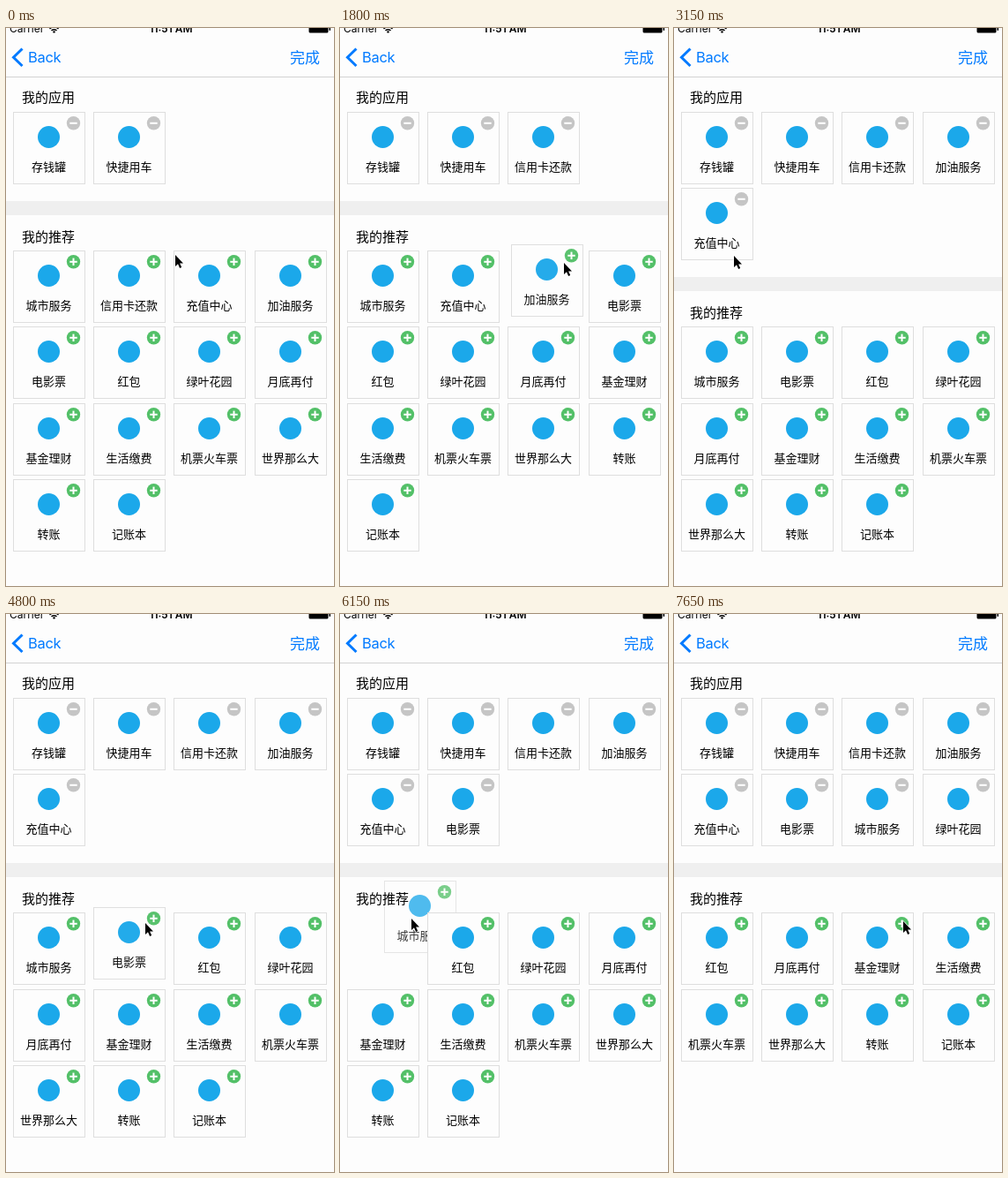
Animation of 372 by 632 pixels, one loop 8 s. Source, as an HTML page:

```html
<!DOCTYPE html>
<html lang="zh-CN">
<head>
<meta charset="utf-8">
<title>应用管理</title>
<style>
  html, body { margin: 0; width: 100%; height: 100%; overflow: hidden; background: #fdfdfd; }
  svg { display: block; width: 372px; height: 632px; }
  text { font-family: "Noto Sans CJK SC", "Noto Sans CJK", sans-serif; fill: #000; }
  .latin { font-family: Inter, Roboto, sans-serif; }
  .status { font-size: 12px; }
  .bold { font-weight: 600; }
  .link { fill: #007aff; font-size: 17px; }
  .back { font-size: 16.5px; letter-spacing: -.3px; }
  .title { font-size: 15px; }
  .name { font-size: 13px; text-anchor: middle; }
  .box { fill: #fdfdfd; stroke: #dedede; }
  .icon { fill: #1ba8ea; }
  .badge { fill: #53c068; }
  .sign { stroke: #fff; stroke-width: 2; fill: none; }
  .mine .badge { fill: #c5c5c5; }
  .mine .bar { display: none; }
</style>
</head>
<body>
<svg viewBox="0 0 372 632" xmlns="http://www.w3.org/2000/svg">
  <rect width="372" height="632" fill="#fdfdfd"/>
  <g id="cards"></g>

  <text class="title" x="18" y="84">我的应用</text>
  <g id="more">
    <rect y="196" width="372" height="16" fill="#efefef"/>
    <text class="title" x="18" y="242">我的推荐</text>
  </g>

  <g id="nav">
    <text class="latin status" x="4" y="5">Carrier</text>
    <path d="M49.5 .8Q54.5 -3 59.5 .8M51.5 2.8Q54.5 .6 57.5 2.8" fill="none" stroke="#000" stroke-width="1.5"/>
    <circle cx="54.5" cy="4.4" r="1.2"/>
    <text class="latin status bold" x="187" y="5" text-anchor="middle">11:51 AM</text>
    <rect x="343.5" y="-4" width="22" height="9.5" rx="1.5"/>
    <rect x="366.5" y="-1" width="1.5" height="4" rx=".7"/>
    <path d="M18.5 23.5L8.5 33.2L18.5 43" fill="none" stroke="#007aff" stroke-width="3"/>
    <text class="latin link back" x="25" y="39">Back</text>
    <text class="link" x="322" y="39.5">完成</text>
    <rect y="55" width="372" height="1" fill="#d2d2d2"/>
  </g>

  <path id="cursor" d="M1 1V14L4 11.2L6.1 16L8.2 15.1L6.1 10.4H10Z" fill="#000" stroke="#fff" stroke-width="1.2" paint-order="stroke"/>
</svg>
<script>
const LOOP = 8000, STEP = 150, FLY = 500, ROW = 86.33, COL = 91.34;
const owned = ['存钱罐', '快捷用车'];
const offered = ['城市服务', '信用卡还款', '充值中心', '加油服务', '电影票', '红包', '绿叶花园',
  '月底再付', '基金理财', '生活缴费', '机票火车票', '世界那么大', '转账', '记账本'];

// Each tap sends one offered card up to the first free slot.
const taps = [
  { at: 563, index: 1 },
  { at: 1725, index: 2 },
  { at: 2300, index: 1 },
  { at: 4730, index: 1 },
  { at: 5984, index: 0, under: true },
  { at: 7080, index: 1 }
];

// time, x, y
const route = [
  [0, 191, 256], [450, 166, 264], [800, 166, 264], [1050, 241, 265], [1500, 253, 265],
  [1800, 253, 265], [2250, 163, 265], [2750, 163, 265], [3150, 67, 257],
  [3950, 67, 257], [4750, 157, 349], [5150, 157, 349], [5400, 80, 344],
  [6500, 80, 344], [6900, 163, 349], [7250, 163, 349], [7650, 259, 347], [LOOP, 259, 347]
];

const layer = document.getElementById('cards');
const more = document.getElementById('more');
const cursor = document.getElementById('cursor');
const cards = {};

for (const name of [...owned, ...offered]) {
  const g = document.createElementNS('http://www.w3.org/2000/svg', 'g');
  g.innerHTML = `<rect class="box" x=".5" y=".5" width="81" height="81"/>
    <circle class="icon" cx="40.5" cy="28.5" r="12.5"/>
    <circle class="badge" cx="68.5" cy="12.8" r="7.7"/>
    <path class="sign" d="M64.3 12.8h8.4"/><path class="sign bar" d="M68.5 8.6v8.4"/>
    <text class="name" x="40.5" y="67">${name}</text>`;
  cards[name] = g;
}

const move = (el, x, y) => el.setAttribute('transform', `translate(${x} ${y})`);
const mix = (a, b, k) => a + (b - a) * k;

function slot(i, top) {
  return [Math.floor(8 + COL * (i % 4)), Math.round(top + ROW * Math.floor(i / 4))];
}

// cubic-bezier(.42, 0, .58, 1)
function ease(x) {
  let lo = 0, hi = 1, s = .5;
  for (let i = 0; i < 20; i++) {
    s = (lo + hi) / 2;
    const bx = 1.26 * s * (1 - s) ** 2 + 1.74 * s * s * (1 - s) + s ** 3;
    if (bx < x) lo = s; else hi = s;
  }
  return s * s * (3 - 2 * s);
}

function placeCursor(t) {
  const i = route.findIndex(p => p[0] > t);
  const [t0, x0, y0] = route[i - 1], [t1, x1, y1] = route[i];
  const k = (t - t0) / (t1 - t0), e = k * k * (3 - 2 * k);
  move(cursor, mix(x0, x1, e), mix(y0, y1, e));
}

function draw(t) {
  const top = [...owned], rest = [...offered];
  let flying = null;
  for (const tap of taps) {
    if (t >= tap.at + FLY) top.push(...rest.splice(tap.index, 1));
    else if (t >= tap.at) flying = tap;
  }
  const shift = top.length > 4 ? ROW : 0;
  move(more, 0, Math.round(shift));

  const show = (name, pos, mine) => {
    const g = cards[name];
    g.setAttribute('class', mine ? 'mine' : '');
    g.setAttribute('opacity', 1);
    move(g, ...pos);
    layer.append(g);
  };
  top.forEach((name, i) => show(name, slot(i, 95), true));
  rest.forEach((name, i) => show(name, slot(i, 252 + shift), false));

  if (flying) {
    const g = cards[rest[flying.index]];
    const k = ease((t - flying.at) / FLY);
    const [x0, y0] = slot(flying.index, 252 + shift), [x1, y1] = slot(top.length, 95);
    move(g, Math.round(mix(x0, x1, k)), Math.round(mix(y0, y1, k)));
    g.setAttribute('opacity', 1 - k);
    if (flying.under) layer.prepend(g); else layer.append(g);
  }
  placeCursor(t);
}

let last = -1;
function tick() {
  // The screen refreshes in coarse steps.
  const t = Math.floor(performance.now() % LOOP / STEP) * STEP;
  if (t !== last) draw(last = t);
  requestAnimationFrame(tick);
}
tick();
</script>
</body>
</html>
```
